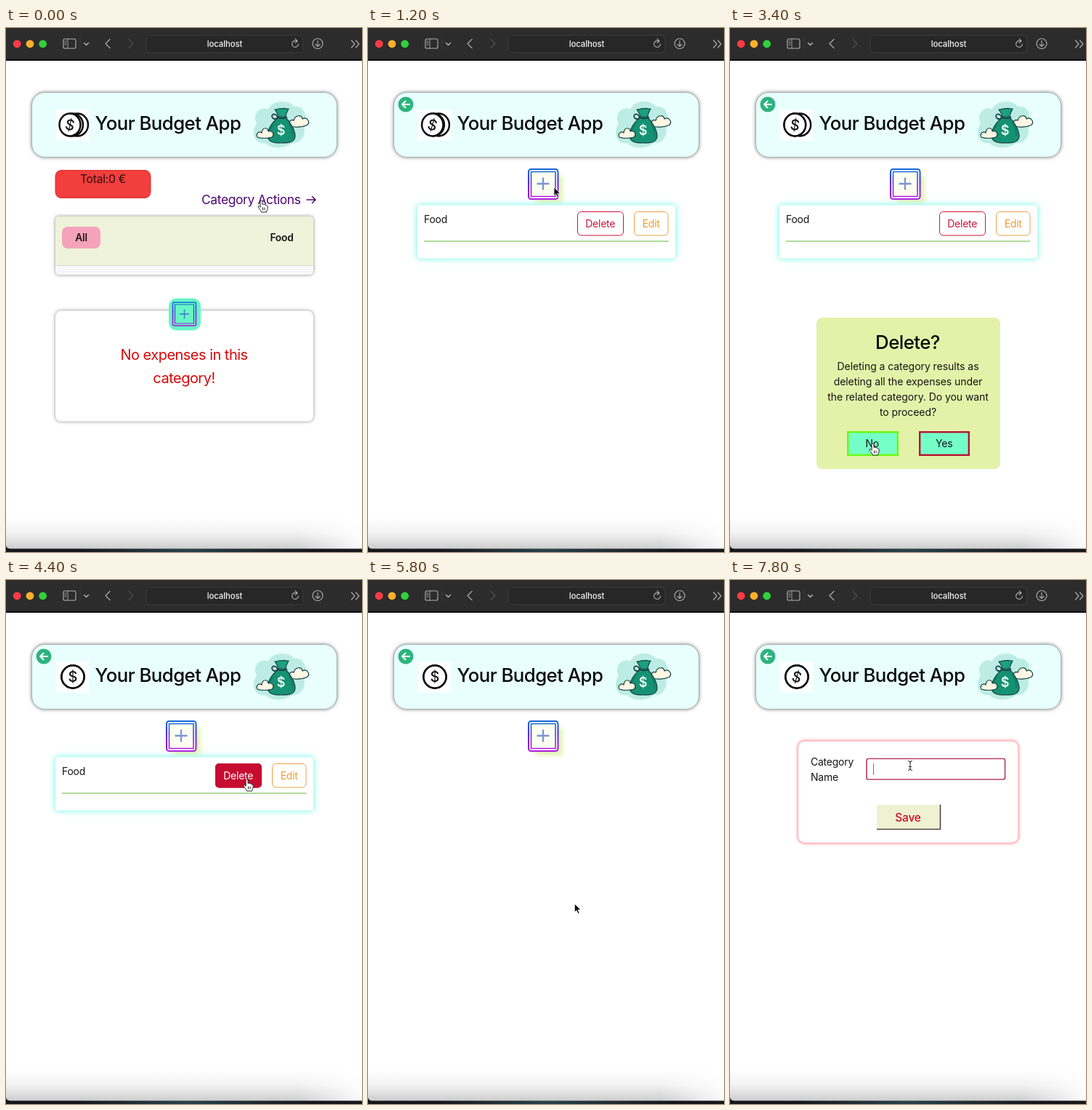
Recreate the animation shown at these times as an HTML page. Size 490 px wide and 720 px high, loop 8000 ms.

```html
<!DOCTYPE html>
<html lang="en">
<head>
<meta charset="utf-8">
<title>Budget app demo</title>
<style>
html, body { margin: 0; width: 100%; height: 100%; overflow: hidden; background: #fff; }
svg { display: block; width: 490px; height: 720px; }
text { font: 14px Inter, "Open Sans", sans-serif; letter-spacing: -.25px; fill: #151515; white-space: pre; }
.mid { text-anchor: middle; }
.title { font-size: 25.8px; font-weight: 500; letter-spacing: -.55px; fill: #080808; }
.tab { font-weight: 600; font-size: 13.8px; }
.warn { font-size: 20px; letter-spacing: -.52px; fill: #d90909; }
.line { fill: none; stroke-linecap: round; stroke-linejoin: round; }
.grey { filter: drop-shadow(0 0 2.5px #888); }
.cyan { filter: drop-shadow(0 0 4px #9ff8ee) drop-shadow(0 0 2px #b5fbf3); }
.pink { filter: drop-shadow(0 0 2px #ff9ca8); }
.scene { visibility: hidden; }
</style>
</head>
<body>
<svg viewBox="0 0 490 720">
  <defs>
    <linearGradient id="dock" x2="0" y2="1">
      <stop offset="0" stop-color="#999" stop-opacity="0"/>
      <stop offset=".5" stop-color="#999" stop-opacity=".13"/>
      <stop offset="1" stop-color="#909090" stop-opacity=".46"/>
    </linearGradient>
    <linearGradient id="fade">
      <stop offset=".82" stop-color="#fff" stop-opacity="0"/>
      <stop offset="1" stop-color="#fff" stop-opacity=".9"/>
    </linearGradient>
    <linearGradient id="strip">
      <stop offset=".2" stop-color="#17171b"/>
      <stop offset=".5" stop-color="#28414b"/>
      <stop offset=".85" stop-color="#17171b"/>
    </linearGradient>
    <linearGradient id="violet" x2="0" y2="1">
      <stop stop-color="#1468d8"/><stop offset=".4" stop-color="#4a30e4"/><stop offset="1" stop-color="#ae14de"/>
    </linearGradient>
    <filter id="blur" x="-50%" y="-50%" width="200%" height="200%"><feGaussianBlur stdDeviation="3"/></filter>
  </defs>

  <rect width="490" height="720" fill="#fff"/>
  <rect y="672" width="490" height="44" fill="url(#dock)"/>
  <rect y="672" width="490" height="44" fill="url(#fade)"/>
  <path d="M0 711Q1 715.500 6 715.500H490V720H0Z" fill="url(#strip)"/>

  <!-- browser bar -->
  <rect width="490" height="43" fill="#2c2c2c"/>
  <rect y="43" width="490" height="2" fill="#0e0912"/>
  <circle cx="15.200" cy="21.800" r="5.400" fill="#ff3b47"/>
  <circle cx="33" cy="21.800" r="5.400" fill="#ffb02e"/>
  <circle cx="50.700" cy="21.800" r="5.400" fill="#31d13c"/>
  <rect x="193" y="10" width="216" height="24" rx="6" fill="#272727" stroke="#3d3d3d"/>
  <g class="line" stroke="#adadad" stroke-width="1.150">
    <rect x="79" y="15" width="17" height="13" rx="2"/>
    <path d="M85 15V28M81 18H83M81 20.500H83M81 23H83" stroke-width=".9"/>
    <path d="M107.500 20.500L110.500 23.500L113.500 20.500" stroke-width="1.500"/>
    <path d="M143 15.500L137 21.500L143 27.500"/>
    <path d="M169 15.500L175 21.500L169 27.500" stroke="#505050"/>
    <path d="M102 14V29" stroke="#383838" stroke-width="1"/>
    <path d="M400 18A4.400 4.400 0 1 0 402.400 22M398 15L401 18L398 20.500"/>
    <circle cx="429" cy="21.500" r="7"/>
    <path d="M429 17.500V25M426 22.500L429 25.300L432 22.500"/>
    <path d="M475.500 17L480 22L475.500 27M481.500 17L486 22L481.500 27"/>
  </g>
  <text class="mid" x="301" y="26" style="font-size:11.4px;font-weight:500;letter-spacing:-.1px;fill:#f2f2f2">localhost</text>

  <g class="scene" data-name="header">
    <rect class="grey" x="35.500" y="88.500" width="420" height="89" rx="18" fill="#e8fffe" stroke="#a6b0b0"/>
    <rect x="69" y="112" width="45" height="43" fill="#fbffff"/>
    <g id="coin" stroke="#0b0b0b" stroke-width="2.500" fill="#fff">
      <ellipse cy="133" ry="15.500"/><ellipse cy="133" ry="15.500"/><ellipse cy="133" ry="15.500"/>
      <text class="mid" id="dollar" y="7.200" stroke="none" style="font-size:20px;font-weight:500;letter-spacing:0">$</text>
    </g>
    <text class="title" x="122.500" y="139.500">Your Budget App</text>
    <!-- money bag -->
    <path d="M345 131C338 119 350 106 361 112C366 98 390 98 396 108C411 106 416 122 409 132C415 146 406 160 393 158C384 167 364 166 357 158C341 160 337 143 345 131Z" fill="#bcece4"/>
    <g class="line" stroke="#163e42" stroke-width="1.200">
      <path d="M392 135C387 130 392 125 396 127C398 119 407 119 408 125C414 121 419 129 415 133C410 136 398 137 392 135Z" fill="#fff6e4"/>
      <path d="M375 123C366 129 359 141 360 149C361 157 369 158 379 158C390 158 397 157 398 149C398 141 392 130 385 123Z" fill="#159273"/>
      <path d="M375 122C374 117 372 115 370 112C374 113 376 109 380 111C383 109 386 112 389 111C387 115 385 118 385 122Z" fill="#19a27f"/>
      <path d="M373.500 122.500Q380 126 386.500 122.500M374 123C369 128 364 122 367 119C370 117 373 120 374 123" stroke-width="1.700"/>
      <path d="M346 150C343 145 349 141 352 144C353 135 361 137 361 142C367 140 370 146 366 150C360 152 351 152 346 150Z" fill="#fff6e4"/>
      <path d="M389 131Q395 139 394 148M368 133Q364 138 363 141" stroke="#0d6f5b"/>
    </g>
    <text class="mid" x="378.500" y="147" style="font-size:18px;font-weight:600;fill:#effff5">$</text>
  </g>

  <g class="scene" data-name="back">
    <circle cx="52" cy="105" r="10.500" fill="#2fb37f"/>
    <path class="line" d="M57 105H47.500M51.500 100.700L47.200 105L51.500 109.300" stroke="#fff" stroke-width="2.200"/>
  </g>

  <g class="scene" data-name="home">
    <rect x="68" y="195.500" width="131" height="38" rx="8" fill="#f23e3c" stroke="#d9312f"/>
    <text class="mid" x="133.500" y="213" style="font-size:15.700px;fill:#2b1010">Total:0 €</text>
    <text x="269" y="242" style="font-size:17.500px;letter-spacing:-.42px;fill:#4f0872">Category Actions</text>
    <path class="line" d="M414 236H426M421.500 231.500L426 236L421.500 240.500" stroke="#4f0872" stroke-width="1.500"/>
    <g class="grey">
      <rect x="68" y="259" width="355" height="80" rx="5" fill="#f8f8f8"/>
      <path d="M68 326V264Q68 259 73 259H418Q423 259 423 264V326Z" fill="#eff3da"/>
    </g>
    <path d="M68 326.500H423" stroke="#d8d8d4"/>
    <rect x="77" y="273" width="53" height="30" rx="8" fill="#f5a3bd"/>
    <text class="tab mid" x="103.500" y="293">All</text>
    <text class="tab mid" x="379.500" y="293">Food</text>
    <rect class="grey" x="68" y="388.500" width="355" height="152" rx="8" fill="#fff"/>
    <rect x="224" y="371.500" width="44" height="44" rx="11" fill="#68f6c6"/>
    <g class="line" stroke="url(#violet)">
      <rect x="229.500" y="377" width="32" height="32" rx="2" stroke-width="1.500"/>
      <rect x="232.500" y="380" width="26" height="26" stroke-width="1.200"/>
    </g>
    <path d="M239 393H252M245.500 386.500V399.500" stroke="#3b75d8" stroke-width="1.300"/>
    <text class="warn mid" x="245" y="456">No expenses in this</text>
    <text class="warn mid" x="245" y="488">category!</text>
  </g>

  <g class="scene" data-name="list">
    <rect x="230" y="203" width="38" height="38" rx="4" fill="#dcf3a4" opacity=".85" filter="url(#blur)"/>
    <rect x="221" y="194" width="40.500" height="41" rx="3.500" fill="#fff" stroke="url(#violet)" stroke-width="2"/>
    <rect x="224.500" y="197.500" width="33.500" height="34" fill="#fbfdf1" stroke="url(#violet)" stroke-width="1.500"/>
    <path d="M232.500 214H249.500M241 205.500V222.500" stroke="#7d95d2" stroke-width="2.300"/>
  </g>

  <g class="scene" data-name="food">
    <rect class="cyan" x="68" y="243.500" width="355" height="73" rx="4" fill="#fff"/>
    <text x="77" y="267.500">Food</text>
    <path d="M77 293H413.500" stroke="#93cf78" stroke-width="1.300"/>
    <rect x="288.500" y="252.500" width="63" height="32.500" rx="5" fill="#fff" stroke="#c8143a"/>
    <rect x="366.500" y="252.500" width="46.500" height="32.500" rx="5" fill="#fff" stroke="#eda244"/>
    <text class="mid" x="319.700" y="273.500" style="fill:#c8143a">Delete</text>
    <text class="mid" x="389.700" y="273.500" style="fill:#f39a2c">Edit</text>
  </g>
  <g class="scene" data-name="deleteHover">
    <rect x="288" y="252" width="64" height="33.500" rx="5" fill="#c60c30"/>
    <text class="mid" x="319.700" y="273.500" style="fill:#fff">Delete</text>
  </g>

  <g class="scene" data-name="dialog">
    <rect x="119" y="398" width="253" height="208" rx="8" fill="#e4f2a9"/>
    <text class="title mid" x="244.500" y="441">Delete?</text>
    <g class="mid" id="message"></g>
    <rect x="162.200" y="555.200" width="68.600" height="31.600" fill="#74ffc8" stroke="#6bfb10" stroke-width="2.400"/>
    <rect x="261.200" y="555.200" width="67.600" height="31.600" fill="#74ffc8" stroke="#b81433" stroke-width="2.400"/>
    <text class="mid" x="195.800" y="576">No</text>
    <text class="mid" x="294.700" y="576">Yes</text>
  </g>
  <g class="scene" data-name="yesHover">
    <rect x="263" y="557" width="69.500" height="34" fill="#777b70"/>
    <rect x="260.700" y="554.700" width="68.600" height="32.600" fill="#c60c30" stroke="#d8233f" stroke-width="1.500"/>
    <text class="mid" x="294.700" y="576">Yes</text>
  </g>

  <g class="scene" data-name="form">
    <rect class="pink" x="93.500" y="221" width="303.500" height="140.500" rx="9" fill="#fff" stroke="#ffb5bc" stroke-width="1.400"/>
    <text x="111" y="255">Category</text>
    <text x="111" y="276">Name</text>
    <rect x="188" y="245.500" width="190.500" height="28.500" rx="2.500" fill="#fff" stroke="#bd416b" stroke-width="1.700"/>
    <path d="M197.500 252V268" stroke="#777"/>
    <rect x="202" y="309" width="88" height="34" fill="#eef2d2"/>
    <path d="M202 342.500H289.500V308.500" fill="none" stroke="#4a4a46" stroke-width="1.600"/>
    <text class="mid" x="245" y="331.500" style="font-size:15.500px;font-weight:500;fill:#cb0b2b">Save</text>
  </g>

  <g id="cursor" class="line" stroke-width="1">
    <path data-kind="arrow" d="M0 0V11.500L2.700 9L4.600 13.500L6.600 12.600L4.700 8.300H8.300Z" fill="#080808" stroke="#fff" stroke-width=".8"/>
    <path data-kind="hand" d="M-2 1.300C-2 -.5 1 -.5 1 1.300V5.500C2 4.800 3.500 5 3.700 6C5 5.500 6 6 6.200 7C7.500 6.700 8.300 7.500 8.300 9C8.300 12 7 13 6.500 16H-.5C-1 13.500 -4 11 -5 8.800C-5.300 7 -3.500 6.800 -2 9Z M1.500 10V13M4 10V13" fill="#fff" stroke="#222"/>
    <path data-kind="beam" d="M-2.500 -6.500Q0 -6.500 0 -4Q0 -6.500 2.500 -6.500M0 -4V4M-2.500 6.500Q0 6.500 0 4Q0 6.500 2.500 6.500M-1.500 1.500H1.500" stroke="#222"/>
  </g>
</svg>
<script>
const LOOP = 8000, STEP = 200;

const list = "header back list food";
const scenes = [
  [0, "header home"],
  [600, ""],
  [800, list],
  [1800, list + " deleteHover"],
  [2200, list + " deleteHover dialog"],
  [2800, list + " dialog"],
  [3600, list],
  [4200, list + " deleteHover"],
  [4800, list + " dialog"],
  [5000, list + " dialog yesHover"],
  [5600, "header back list"],
  [6600, ""],
  [6800, "header back form"]
];

// time, x, y, kind
const moves = [
  [0, 352, 237, "hand"], [400, 352, 237, "hand"], [600, 352, 237, "arrow"],
  [800, 335, 236, "arrow"], [1200, 256, 219, "arrow"], [1400, 256, 219, "arrow"],
  [1800, 307, 264, "hand"], [2000, 313, 269, "hand"], [2600, 313, 269, "hand"],
  [2800, 275, 365, "arrow"], [3200, 197, 571, "hand"], [3400, 197, 571, "hand"],
  [3600, 212, 530, "arrow"], [4200, 330, 276, "hand"], [4400, 332, 274, "hand"],
  [4600, 332, 274, "hand"], [4800, 320, 430, "arrow"], [5000, 311, 581, "hand"],
  [5400, 311, 581, "hand"], [5600, 306, 560, "arrow"], [6200, 241, 215, "arrow"],
  [7200, 241, 215, "arrow"], [7600, 247, 249, "beam"], [7800, 248, 255, "beam"]
];

// time, stack spread, dollar tilt
const coinSteps = [
  [0, 5, 12], [600, 0, 0], [1200, 4, 16], [1800, 0, 0], [2400, 5, 12], [3000, 0, 0],
  [3600, 5, 12], [4400, 0, 0], [5200, 6, 8], [5800, 0, 0], [7200, 5, 12], [7800, 0, 16]
];

const $ = id => document.getElementById(id);
const layers = [...document.querySelectorAll(".scene")];
const pointers = [...$("cursor").children];
const rings = [...document.querySelectorAll("#coin ellipse")];

const message = ["Deleting a category results as", "deleting all the expenses under",
  "the related category. Do you want", "to proceed?"];
$("message").innerHTML = message.map((line, i) =>
  `<text x="245" y="${470 + 21 * i}" style="letter-spacing:-.06px">${line}</text>`).join("");

const latest = (table, t) => table.filter(row => row[0] <= t).pop();

function between(table, t, column) {
  const a = latest(table, t), b = table[table.indexOf(a) + 1];
  return b ? a[column] + (b[column] - a[column]) * (t - a[0]) / (b[0] - a[0]) : a[column];
}

function drawCoin(t) {
  const spread = between(coinSteps, t, 1), tilt = between(coinSteps, t, 2);
  const front = 92 - .8 * spread, back = 2.1 * spread;
  // the middle coin slides out last
  const offsets = [back, Math.max(0, back - 7), 0];
  rings.forEach((ring, i) => {
    ring.setAttribute("cx", front + offsets[i]);
    ring.setAttribute("rx", 15.5 - .2 * spread);
  });
  $("dollar").setAttribute("transform", `translate(${front} 133) rotate(${tilt})`);
}

function render(t) {
  const shown = latest(scenes, t)[1].split(" ");
  for (const layer of layers)
    layer.style.visibility = shown.includes(layer.dataset.name) ? "visible" : "hidden";
  const kind = latest(moves, t)[3];
  for (const pointer of pointers)
    pointer.style.display = pointer.dataset.kind === kind ? "" : "none";
  $("cursor").setAttribute("transform", `translate(${between(moves, t, 1)} ${between(moves, t, 2)})`);
  drawCoin(t);
}

const start = performance.now();
function tick() {
  const t = (performance.now() - start) % LOOP;
  render(Math.floor(t / STEP) * STEP);
  requestAnimationFrame(tick);
}
tick();
</script>
</body>
</html>
```
